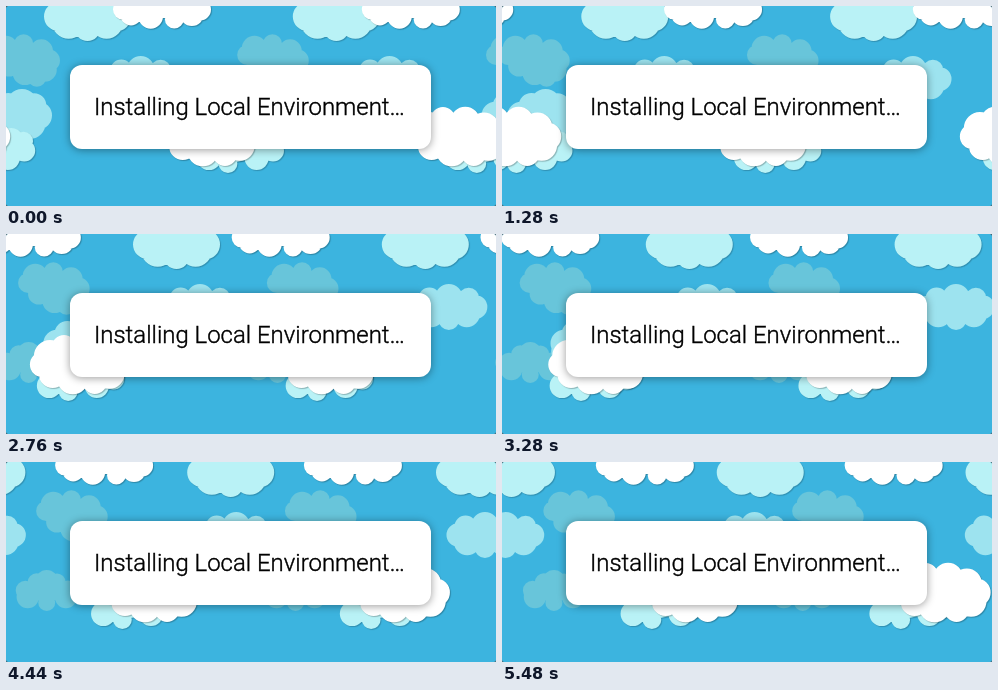
Recreate the animation shown at these times as an HTML page with a canvas. Size 490 px wide and 200 px high, loop 5.52 s.

```html
<!DOCTYPE html>
<html lang="en">
<head>
<meta charset="utf-8">
<title>Installing</title>
<style>
html, body { margin: 0; width: 490px; height: 200px; overflow: hidden; background: #3cb4df; }
canvas { display: block; }
</style>
</head>
<body>
<canvas id="sky" width="490" height="200"></canvas>
<script>
const W = 490, H = 200;
const LOOP = 5520, STEP = 40;
const TILE = 248.8;
const DRIFT = 0.01075; // px per ms of the slowest layer
const ctx = document.getElementById('sky').getContext('2d');

// A cloud is a ring of puffs inside a box. `lean` slides the bottom sideways,
// `taper` widens the bottom (or the top, if negative).
function makeCloud({ x, y, w, h, count, size, lean = 0, taper = 0 }) {
  return Array.from({ length: count }, (_, i) => {
    const angle = 2 * Math.PI * i / count;
    const r = size * (1 + 0.15 * Math.sin(2.4 * i));
    const c = Math.cos(angle), s = Math.sin(angle);
    return {
      x: x + w / 2 + (w / 2 - r) * c * (1 + taper * s) + lean * s,
      y: y + h / 2 + (h / 2 - r) * s,
      r
    };
  });
}

// From the farthest and slowest layer to the nearest and fastest.
const layers = [
  {
    color: '#68c5da', shade: 0,
    clouds: [
      { x: -14, y: 28, w: 68, h: 53, count: 9, size: 11, lean: 8, taper: -0.3 },
      { x: -38, y: 108, w: 62, h: 41, count: 8, size: 10, taper: 0.5 }
    ]
  },
  {
    color: '#9de3ef', shade: 0,
    clouds: [
      { x: 345, y: 50, w: 77, h: 46, count: 8, size: 12 },
      { x: -22, y: 83, w: 68, h: 53, count: 8, size: 14, lean: -4, taper: 0.2 }
    ]
  },
  {
    color: '#b9f2f6', shade: 0.2,
    clouds: [
      { x: 38, y: -14, w: 87, h: 49, count: 8, size: 15 },
      { x: 198, y: 122, w: 80, h: 45, count: 8, size: 11, lean: -16, taper: 0.3 }
    ]
  },
  {
    color: '#ffffff', shade: 0.25,
    clouds: [
      { x: 107, y: -16, w: 98, h: 39, count: 10, size: 11 },
      { x: 154, y: 100, w: 99, h: 61, count: 10, size: 14, lean: 4 }
    ]
  }
].map(layer => ({ ...layer, clouds: layer.clouds.map(makeCloud) }));

const text = 'Installing Local Environment…';
const fontOf = size => `300 ${size}px Roboto, sans-serif`;
ctx.font = fontOf(24);
const labelFont = fontOf(24 * 311 / ctx.measureText(text).width);

function setShadow(alpha, blur, dx, dy) {
  ctx.shadowColor = `rgba(0, 0, 0, ${alpha})`;
  ctx.shadowBlur = blur;
  ctx.shadowOffsetX = dx;
  ctx.shadowOffsetY = dy;
}

function traceCloud(puffs, dx) {
  puffs.forEach((p, i) => ctx[i ? 'lineTo' : 'moveTo'](p.x + dx, p.y));
  ctx.closePath();
  for (const p of puffs) {
    ctx.moveTo(p.x + dx + p.r, p.y);
    ctx.arc(p.x + dx, p.y, p.r, 0, Math.PI * 2);
  }
}

function drawLayer({ clouds, color, shade }, shift) {
  ctx.save();
  setShadow(shade, 1, 1, 1);
  ctx.fillStyle = color;
  ctx.beginPath();
  for (const puffs of clouds) {
    for (let tile = -3; tile <= 2; tile++) traceCloud(puffs, shift + tile * TILE);
  }
  ctx.fill();
  ctx.restore();
}

function drawCard() {
  ctx.save();
  setShadow(0.4, 9, 0, 1);
  ctx.fillStyle = '#fff';
  ctx.beginPath();
  ctx.roundRect(64, 59, 361, 84, 12);
  ctx.fill();
  ctx.restore();

  ctx.fillStyle = ctx.strokeStyle = '#000';
  ctx.lineWidth = 0.4;
  ctx.font = labelFont;
  ctx.textAlign = 'center';
  ctx.fillText(text, 243.4, 109);
  ctx.strokeText(text, 243.4, 109);
}

function draw(t) {
  ctx.fillStyle = '#4a5a60';
  ctx.fillRect(0, 0, W, H);
  ctx.save();
  ctx.beginPath();
  ctx.roundRect(0, 0, W, H, 2.5);
  ctx.clip();
  ctx.fillStyle = '#3cb4df';
  ctx.fillRect(0, 0, W, H);
  layers.forEach((layer, i) => drawLayer(layer, t * DRIFT * (i + 1)));
  drawCard();
  ctx.restore();
}

const start = performance.now();
function tick() {
  const t = Math.max(0, performance.now() - start) % LOOP;
  draw(Math.floor(t / STEP) * STEP);
  requestAnimationFrame(tick);
}
tick();
</script>
</body>
</html>
```
